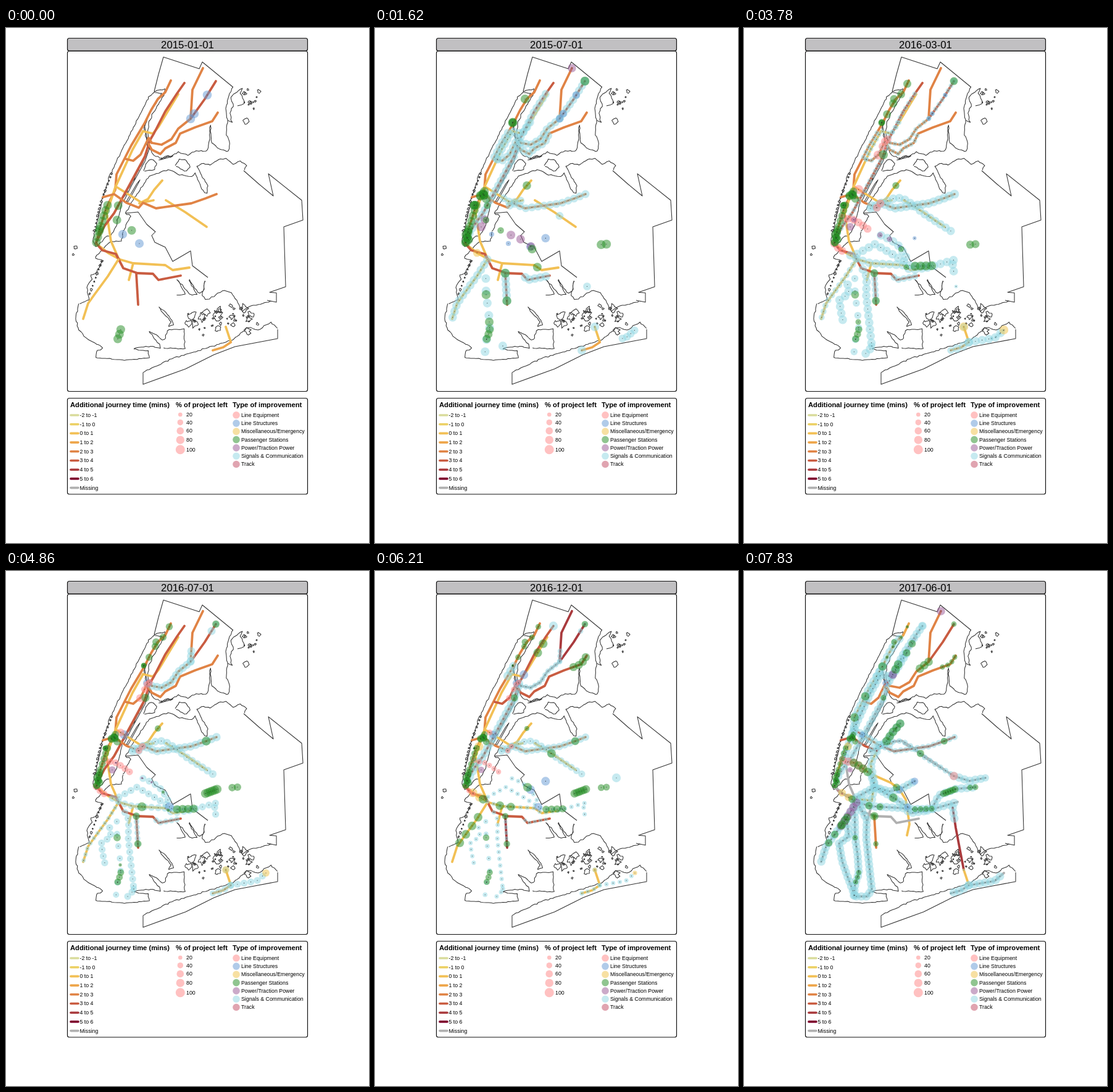
Animation, 588 px wide and 834 px high, one loop 8000 ms. Source, as an HTML page:

```html
<!DOCTYPE html>
<html lang="en">
<head>
<meta charset="utf-8">
<title>Journey time and improvement works</title>
<style>
html, body { margin: 0; width: 100%; height: 100%; overflow: hidden; background: #fff; }
svg { display: block; width: 588px; height: 834px; font-family: "Liberation Sans", Arial, sans-serif; }
</style>
</head>
<body>
<svg viewBox="0 0 588 834">
  <g fill="#fff" stroke="#111" stroke-width="1.2">
    <rect x="99.5" y="16.5" width="389" height="20.5" rx="3" fill="#c1c0c2"/>
    <rect x="99.5" y="37.5" width="389" height="551" rx="3"/>
    <rect x="99.5" y="599.5" width="389" height="155.5" rx="3"/>
  </g>
  <text id="date" x="294" y="33" font-size="16.8" text-anchor="middle"></text>
  <g id="coast" fill="none" stroke="#333" stroke-width="1.05" stroke-linejoin="round"></g>
  <g id="lines" fill="none" stroke-width="3.8" stroke-linecap="round" stroke-linejoin="round"></g>
  <g id="bubbles"></g>
  <g id="legend" font-size="8.8"></g>
</svg>
<script>
const STEP = 270, LOOP = 8000, FULL = 7.5;
const $ = id => document.getElementById(id);
const ramp = ['#d9dc9c', '#ecd063', '#f2c055', '#eea64b', '#e08345', '#c95c41', '#a93a3d', '#800530', '#b0b0b0'];
const types = {
  E: ['Line Equipment', '#ff8484'],
  S: ['Line Structures', '#6197d3'],
  M: ['Miscellaneous/Emergency', '#efc145'],
  G: ['Passenger Stations', '#228b22'],
  P: ['Power/Traction Power', '#975593'],
  B: ['Signals &amp; Communication', '#8ed6e2'],
  T: ['Track', '#c14961']
};

let seed = 11;
const rnd = () => (seed = seed * 16807 % 2147483647) / 2147483647;
const jit = a => (rnd() * 2 - 1) * a;
const pairs = s => s.split(' ').map(p => p.split(',').map(Number));
const toPath = pts => 'M' + pts.map(p => p[0].toFixed(1) + ' ' + p[1].toFixed(1)).join('L');

// Points every `gap` px between two shares of a polyline's length.
function along(p, gap, from = 0, to = 1) {
  const seg = p.slice(1).map((q, i) => Math.hypot(q[0] - p[i][0], q[1] - p[i][1]));
  const len = seg.reduce((a, b) => a + b), out = [];
  for (let s = len * from; s <= len * to + .01; s += gap) {
    let i = 0, r = s;
    while (i < seg.length - 1 && r > seg[i]) r -= seg[i++];
    const k = Math.min(1, r / seg[i]);
    out.push([0, 1].map(a => p[i][a] + (p[i + 1][a] - p[i][a]) * k));
  }
  return out;
}

// ---- coast: straight borders, rough shores, scattered islets ----
const borders = [
  '240,103 247,75 255,47 313,66 318,55 368,96',
  '385,231 410,253 433,272 425,236 479,279 481,311 450,322 453,419 427,428 438,429 438,444 423,441',
  '193,300 214,298 228,318 242,330 236,336 241,347 258,355 270,378 299,361 302,385 327,404',
  '224,156 228,176 232,196 225,216 203,256 191,280',
  '195,281 212,252 217,246 214,252 198,281 195,281',
  '440,488 440,503 371,516 337,529 291,552 222,577 222,558'
];
const shores = [
  '368,96 362,106 356,132 359,149 366,153 362,138 368,125 363,112 383,96 380,107 388,122 372,126',
  '359,149 356,168 363,190 359,201 341,193 333,186 331,156 329,186 326,199 302,200 297,206 279,201 266,208 250,211 238,205 231,190 229,170 233,148 256,108 258,99 240,103',
  '241,104 232,110 205,164 172,230 158,268 147,318 140,346 146,354 156,346 160,338 170,337 178,322 188,280 224,214 230,198 224,160 232,138 253,106 241,104',
  '222,232 229,216 236,212 245,220 240,229 222,232',
  '248,214 258,207 270,208 248,214',
  '274,222 281,212 293,215 298,226 290,233 274,222',
  '190,330 202,303 193,301 205,280 232,240 264,229 278,237 301,241 306,235 318,262 325,268 327,256 309,224 318,219 330,222 342,213 356,211 368,221 379,215 389,222 385,231',
  '428,443 392,452 383,459 366,428 352,425 325,441 318,432 323,408 319,428 312,430 296,407 309,431 298,432 277,407 292,432 274,433',
  '190,330 187,345 168,346 150,366 144,372 157,377 146,398 137,399 139,407 131,418 134,440 118,447',
  '118,447 113,470 117,488 130,503 158,518 146,524 145,534 190,538 232,534 231,523 205,520 226,515 252,518 232,491 256,506 262,489 288,487 290,520 252,518',
  '247,451 263,464 272,480 262,485 267,477 247,451',
  '222,558 267,536 308,524 367,505 394,484 409,489 429,476 440,488'
];
const rough = s => toPath(along(pairs(s), 4).map(([x, y]) => [x + jit(1), y + jit(1)]));
function islet(x, y, r) {
  const turn = i => i / 10 * 2 * Math.PI;
  const pts = Array.from({ length: 10 }, (_, i) => [x + Math.cos(turn(i)) * r * (.3 + rnd()), y + Math.sin(turn(i)) * r * (.3 + rnd())]);
  return toPath(pts) + 'Z';
}
// Random spots in an ellipse.
const cloud = (x, y, rx, ry, n) => Array.from({ length: n }, () => {
  const a = rnd() * 2 * Math.PI, k = Math.sqrt(rnd());
  return [x + Math.cos(a) * rx * k, y + Math.sin(a) * ry * k];
});
const islets = (spots, size) => spots.map(([x, y]) => islet(x, y, 1 + size * rnd() ** 2)).join('');
const docks = along(pairs('171,236 153,284 143,330'), 6).concat(along(pairs('155,378 135,432'), 7));
$('coast').innerHTML = `<path d="${borders.map(s => toPath(pairs(s))).join('') + shores.map(rough).join('')}"/>` +
  `<path d="${islets(cloud(350, 475, 62, 27, 42), 8) + islets(cloud(398, 112, 14, 20, 12), 2) + islets(docks, 2) +
    islet(113, 355, 3) + islet(109, 367, 2) + islet(389, 150, 5)}"/>`;

// ---- rail lines: key points and class of delay before, during and after the last winter ("." = hidden) ----
const rail = {
  culver: ['179,375 180,432 184,460 186,490 180,506 178,527', '..8'],
  bright: ['184,375 199,403 198,432 202,470 207,515 200,527 178,527', '..8'],
  sea: ['166,402 170,430 154,441 159,470 167,493 180,527', '..8'],
  greenp: ['215,292 205,312 211,342 207,372 180,369', '..2'],
  ridge: ['205,328 212,350 235,357 252,354 277,340', '..8'],
  jam: ['183,366 212,350 245,369 271,386 304,385', '..8'],
  jamEast: ['304,385 316,363 343,353 375,350', '..8'],
  canar: ['160,307 180,311 204,328 238,343 252,354 262,370 268,410 264,428', '..2'],
  fultonEast: ['297,388 346,374', '..8'],
  blvdAll: ['205,292 220,284 243,276 256,275 275,287 290,300 340,332', '..8'],
  hill: ['340,332 365,340 391,335', '..8'],
  rockN: ['338,383 343,416 356,484', '..6'],
  rockE: ['364,509 406,502 421,489', '..8'],
  west: ['267,85 258,104 246,115 235,133 224,155 203,190 179,237 177,262 163,290 152,325 146,349', '443'],
  cross: ['180,258 220,283 239,279', '224'],
  ast: ['253,247 240,262 230,277 216,284', '228'],
  blvd: ['259,279 290,298 325,322', '228'],
  park: ['279,107 268,125 247,160 238,171 222,167 205,197 177,258 163,300 170,345 183,375', '228'],
  eastLow: ['233,182 225,208 205,245 187,278 175,300 160,320 146,347', '558'],
  eastTop: ['289,89 277,106 258,135 240,170 233,182', '558'],
  tipA: ['319,65 302,100 299,147', '464'],
  tipB: ['340,86 322,115 299,147', '565'],
  mid: ['299,147 279,163 268,180 252,189 236,186', '484'],
  link: ['236,186 231,178 218,205 206,215 194,212', '454'],
  pel: ['343,137 334,151 306,161 282,171 275,186 258,195 250,204 236,197 231,188', '454'],
  flush: ['341,269 323,276 300,284 243,292 222,283 215,291 195,283 175,269 157,274', '445'],
  shuttle: ['206,381 199,408', '228'],
  fulton: ['146,349 165,364 185,375 206,381 258,384 270,392 297,388', '228'],
  crown: ['146,349 156,360 178,366 190,389 213,397 238,398 247,408 283,401', '558'],
  nost: ['211,397 214,448', '564'],
  fourth: ['182,375 165,402 143,432 133,446 125,471', '228'],
  rock: ['356,484 364,508', '222'],
  rockW: ['364,509 352,517 335,522', '328']
};

// ---- works: a type active between two months, shrinking as it gets done ----
const works = [];
const put = (type, start, end, spots) => works.push({ type, start, end, spots });
// "name@2-5" means that line from 2 to 5 tenths of its length, "name@2" one station.
function job(type, start, end, gap, where) {
  put(type, start, end, where.split(' ').flatMap(w => {
    const [name, part = '0-10'] = w.split('@'), [a, b = a] = part.split('-').map(Number);
    return along(pairs(rail[name][0]), gap, a / 10, b / 10);
  }));
}

// signals
job('B', 2, 18, 9, 'eastTop@2-10 park@1.7-4.6 west@3.4-5 eastLow mid tipB link pel@5.2-10');
job('B', 3, 14, 10, 'flush@0-7 cross@5-10');
job('B', 12, 42, 9, 'flush@0-7.5');
job('B', 8, 42, 10, 'blvdAll');
job('B', 3, 27, 9, 'nost crown@7.4-10');
job('B', 3, 22, 10, 'fourth');
job('B', 3, 30, 20, 'culver@2-10 bright@8-9 rock@0 rockW@10 tipB@0');
job('B', 2, 16, 8, 'rockE@6-10 rockN@3.5 blvd@6');
job('B', 12, 26, 11, 'bright@1-9 jam canar@3.8-7.2 fulton@2-10 rockW rockE fultonEast rockN@0-2 sea@1-6');
job('B', 15, 27, 8, 'mid tipA@8-10 tipB@1.8');
job('B', 21, 42, 9, 'eastLow eastTop@0 hill@10 west@2.8-3.5');
job('B', 25, 50, 8, 'eastTop park@1-8 bright culver sea fourth jam ridge ast');
job('B', 25, 50, 9, 'west@1-7 fulton@3-10 fultonEast jamEast hill rockE rockW rockN@0-2.5 greenp cross');

// structures
job('S', -1, 18, 37, 'tipB@3.6-9 mid@0');
put('S', -1, 9, [[189, 334], [216, 349]]);
job('S', 4, 16, 28, 'ridge@6.9-10');
job('S', 16, 40, 9, 'jam@7 link@2 cross@2');
job('S', 20, 45, 28, 'ridge@6.9-10 eastTop@8.5');

// emergency, equipment, power
job('M', 13, 26, 9, 'rockE@10 rock@0');
job('M', 3, 14, 9, 'fulton@1.5');
job('M', 20, 50, 10, 'fulton@1 fulton@1.8 park@7');
job('E', 8, 30, 9, 'link@1-4 canar@0-2.6 flush@6.3-7 crown@0-1.5');
job('E', 13, 30, 9, 'link@6 cross@1');
job('E', 25, 45, 9, 'canar@0-2.2 blvdAll@10');
job('P', 4, 14, 9, 'tipA@0 ridge@7');
job('P', 4, 19, 17, 'canar@1 canar@3.7-4.8');
put('P', 4, 40, [[172, 322]]);
job('P', 25, 50, 9, 'tipA@0 fourth@0-4 eastTop@8.5');

// stations
job('G', -6, 50, 9, 'west@7.8-10 west@9.2');
job('G', -6, 45, 8, 'culver@7.4-8.7');
job('G', -2, 14, 9, 'canar@1.1 canar@2.7 eastLow@6.3');
put('G', 3, 45, cloud(176, 271, 7, 9, 8).concat(cloud(149, 338, 4, 11, 6), [[243, 115]]));
put('G', 3, 24, cloud(223, 153, 1, 1, 3).concat(cloud(161, 287, 1, 1, 3)));
job('G', 4, 42, 45, 'nost culver@3.7 tipB@0');
job('G', 4, 45, 8.5, 'jamEast@9-10');
job('G', 4, 20, 9, 'canar@6 culver@6.6 fulton@7.8');
job('G', 1, 32, 9, 'ast@2');
job('G', 8, 32, 20, 'west@.2-2.9');
job('G', 12, 40, 9, 'jam@8-10 eastLow@1.3');
job('G', 16, 45, 4, 'jamEast@3.8-6.3 fulton@5.1-5.3 flush@.9');
job('G', 20, 33, 9, 'pel@.2-2.2');
job('G', 20, 45, 17, 'fourth@2.5-7.7 park@.4-1.4 blvd@4 fulton@4 canar@5.4 fulton@2.2');
job('G', 25, 50, 9, 'west@2.8 west@4.7-5 west@6 ast@0-7 eastTop@6.8-8 mid@0-3 canar@1-2.7 nost@0 fourth@3-4 jam@5');

// ---- legend ----
const text = (x, y, s, more = '') => `<text x="${x}" y="${Math.round(y)}" ${more}>${s}</text>`;
const disc = (x, y, r, c) => `<circle cx="${x.toFixed(1)}" cy="${y.toFixed(1)}" r="${r.toFixed(2)}" fill="${c}" fill-opacity=".5"/>`;
const title = (x, s) => text(x, 614, s, 'font-size="11.2" font-weight="700"');
let key = title(104, 'Additional journey time (mins)') + title(275, '% of project left') + title(367, 'Type of improvement');
ramp.forEach((c, i) => {
  const y = 627 + i * 14.7;
  key += `<path d="M105 ${y}H117" stroke="${c}" stroke-width="3.6" stroke-linecap="round"/>` +
    text(119.5, y + 2.9, i < 8 ? `${i - 2} to ${i - 1}` : 'Missing');
});
for (let i = 0; i < 5; i++) {
  const y = 626 + i * 12.2 + i * i * .5;
  key += disc(282.3, y, FULL * Math.sqrt((i + 1) / 5), types.E[1]) + text(292, y + 2.9, 20 * (i + 1));
}
Object.values(types).forEach(([name, c], i) => {
  const y = 626.8 + i * 13.28;
  key += disc(373, y, 5.8, c) + text(381, y + 2.9, name);
});
$('legend').innerHTML = key;

// ---- monthly picture ----
function draw(month) {
  $('date').textContent = `${2015 + Math.floor(month / 12)}-${String(month % 12 + 1).padStart(2, '0')}-01`;
  const phase = month < 21 ? 0 : month < 26 ? 1 : 2;
  $('lines').innerHTML = Object.values(rail).filter(([, cls]) => cls[phase] != '.')
    .map(([pts, cls]) => `<polyline points="${pts}" stroke="${ramp[cls[phase]]}"/>`).join('');
  let discs = '', dots = '';
  for (const { type, start, end, spots } of works) {
    if (month < start || month >= end) continue;
    const r = FULL * Math.sqrt((end - month) / (end - start));
    for (const [x, y] of spots) {
      discs += disc(x, y, r, types[type][1]);
      dots += `M${x.toFixed(1)} ${y.toFixed(1)}h.01`;
    }
  }
  $('bubbles').innerHTML = discs + `<path d="${dots}" stroke="#222" stroke-width="1.1" stroke-linecap="round"/>`;
}
let shown = -1;
const t0 = performance.now();
function tick(now) {
  const month = Math.floor(Math.max(0, now - t0) % LOOP / STEP);
  if (month !== shown) draw(shown = month);
  requestAnimationFrame(tick);
}
tick(t0);
</script>
</body>
</html>
```
